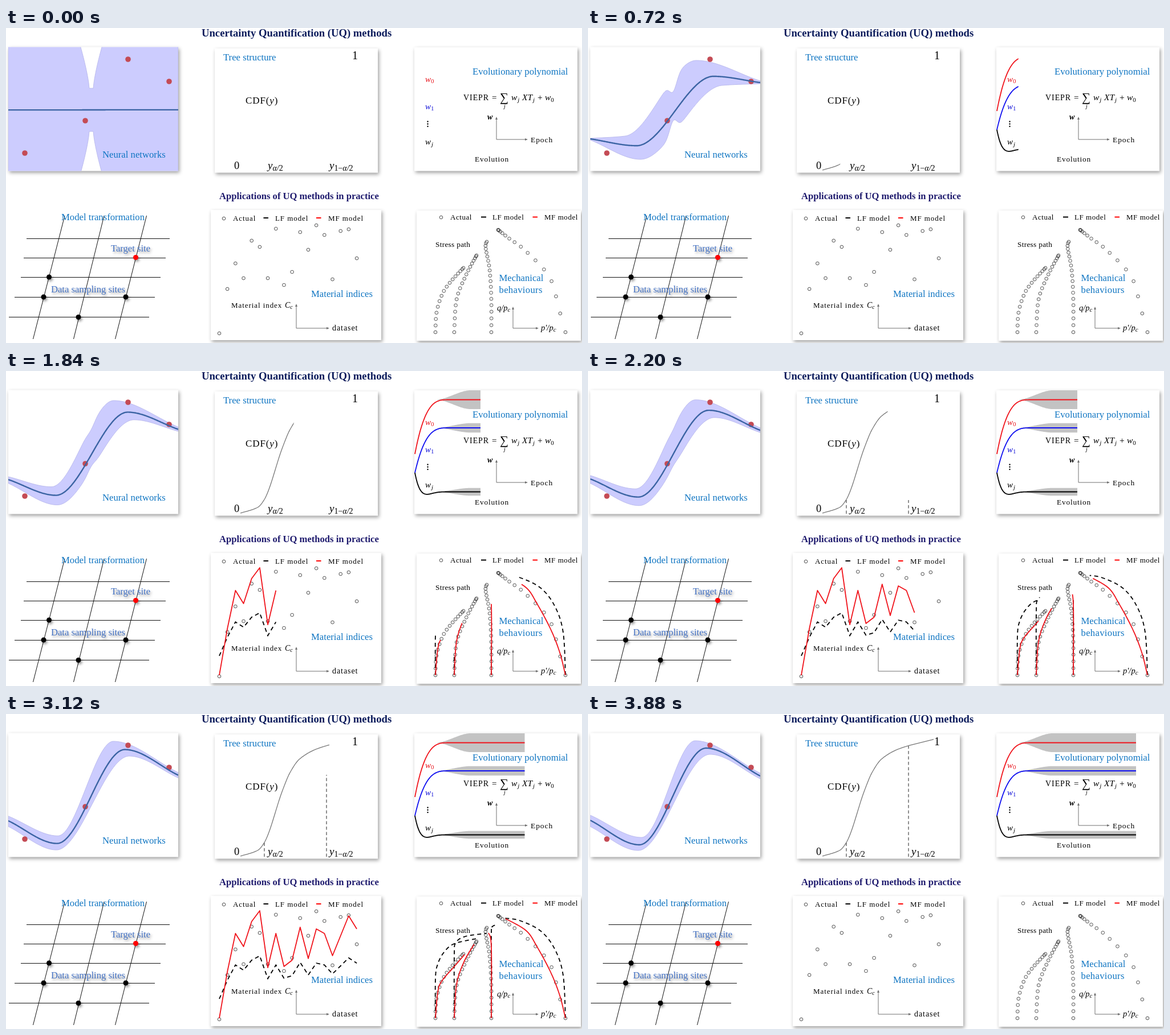
Animation of 1010x554 px, one loop 3920 ms. Source, as an HTML page:

```html
<!DOCTYPE html>
<html lang="en">
<head>
<meta charset="utf-8">
<title>Uncertainty Quantification (UQ) methods</title>
<style>
html, body { margin: 0; width: 100%; height: 100%; overflow: hidden; background: #fff; }
svg { display: block; width: 1010px; height: 554px; font-family: "Liberation Serif", "Times New Roman", serif; font-size: 13px; }
.card { fill: #fff; filter: drop-shadow(2px 3px 3px rgba(0,0,0,.38)); }
.head { font-weight: bold; fill: #0c1c5c; }
.name { font-size: 16.7px; fill: #0f75c2; }
.soft { font-size: 16.6px; fill: #4472c4; filter: drop-shadow(2px 3px 2px rgba(0,0,0,.4)); }
.wide { letter-spacing: .93px; }
.snug { letter-spacing: .55px; }
.it { font-style: italic; }
.line { fill: none; stroke-width: 1.8; }
.axis { fill: none; stroke: #707070; stroke-width: 1; }
.tip { fill: #707070; }
.grid { stroke: #111; stroke-width: 1; }
.node { filter: drop-shadow(2px 3px 2px rgba(0,0,0,.4)); }
.ring { fill: none; stroke: #333; stroke-width: .85; }
.dash { stroke: #555; stroke-width: 1.3; stroke-dasharray: 5.5 4; }
.lf { fill: none; stroke: #000; stroke-width: 1.8; stroke-dasharray: 7 5.5; }
.mf { fill: none; stroke: #f0141c; stroke-width: 1.8; stroke-linejoin: round; }
</style>
</head>
<body>
<svg viewBox="0 0 1010 554">
  <defs>
    <clipPath id="netBox"><rect x="4" y="33.5" width="298" height="218"/></clipPath>
    <clipPath id="cdfClip"><rect id="cdfWipe" x="410" y="36" width="0" height="218"/></clipPath>
    <clipPath id="evoClip"><rect id="evoWipe" x="716" y="30" width="0" height="222"/></clipPath>
  </defs>

  <text class="head" x="343" y="15" font-size="18.67">Uncertainty Quantification (UQ) methods</text>
  <text class="head" x="374" y="301" font-size="16.6" style="fill:#1f1b6e">Applications of UQ methods in practice</text>

  <rect class="card" x="4" y="33.5" width="298" height="218"/>
  <g clip-path="url(#netBox)">
    <path id="band" fill="#ccccfe" stroke="#b4b4ea" stroke-width=".8"/>
    <g fill="#c44b55">
      <circle cx="214" cy="55" r="4.8"/><circle cx="286" cy="94" r="4.8"/>
      <circle cx="139" cy="163" r="4.8"/><circle cx="33" cy="220" r="4.8"/>
    </g>
    <path id="mean" fill="none" stroke="#3b64a3" stroke-width="2.4"/>
  </g>
  <text class="name" x="169" y="228">Neural networks</text>

  <rect class="card" x="366" y="36" width="286" height="218.5"/>
  <polyline id="cdf" class="line" stroke="#777" style="stroke-width:1.3" clip-path="url(#cdfClip)"/>
  <line id="dashLow" class="dash" x1="453" x2="453" y1="251"/>
  <line id="dashHigh" class="dash" x1="562" x2="562" y1="251"/>
  <text class="name" x="381" y="57">Tree structure</text>
  <text x="420" y="133" font-size="17" letter-spacing=".9">CDF(<tspan class="it">y</tspan>)</text>
  <text x="607" y="55" font-size="20">1</text>
  <text x="400" y="248" font-size="18.5">0</text>
  <text class="it" x="459" y="248" font-size="19">y<tspan font-size="14" dy="3">α/</tspan><tspan font-size="14" font-style="normal">2</tspan></text>
  <text class="it" x="567" y="248" font-size="19">y<tspan font-size="14" dy="3" font-style="normal">1−</tspan><tspan font-size="14">α/</tspan><tspan font-size="14" font-style="normal">2</tspan></text>

  <rect class="card" x="716" y="34" width="286" height="217.5"/>
  <g id="evo" clip-path="url(#evoClip)"></g>
  <text class="name" x="818" y="82">Evolutionary polynomial</text>
  <g class="it" font-size="15">
    <text x="735" y="95" fill="#e8141c">w<tspan font-size="11" dy="2" font-style="normal">0</tspan></text>
    <text x="735" y="143" fill="#1414d8">w<tspan font-size="11" dy="2" font-style="normal">1</tspan></text>
    <text x="735" y="205">w<tspan font-size="11" dy="3" dx="1">j</tspan></text>
  </g>
  <circle cx="739.5" cy="164.5" r="1.2"/><circle cx="739.5" cy="168.7" r="1.2"/><circle cx="739.5" cy="173" r="1.2"/>
  <text x="802" y="127" font-size="14" class="wide">VIEPR</text>
  <text x="852" y="127" font-size="15">=</text>
  <text x="866" y="129" font-size="21">∑</text>
  <text class="it" x="873" y="141" font-size="10">j</text>
  <g class="it" font-size="15.5">
    <text x="886" y="127">w<tspan font-size="11" dy="3" dx="1">j</tspan></text>
    <text x="905" y="127">XT<tspan font-size="11" dy="3" dx="1">j</tspan></text>
    <text x="932" y="127" font-style="normal">+</text>
    <text x="945" y="127">w<tspan font-size="11" dy="3" font-style="normal">0</tspan></text>
  </g>
  <text class="it" x="844" y="161" font-size="14" font-weight="bold">w</text>
  <text class="wide" x="920" y="201" font-size="13.5">Epoch</text>
  <text x="822" y="235" font-size="13.3" letter-spacing=".85">Evolution</text>

  <path class="grid" d="M36 370.5H287M31 404.5H280M26 438.5H271M15 473.5H261M5 508.5H251M103 330L47.5 547M172 330L118.5 547M246.5 330L191.5 547"/>
  <g class="node">
    <circle cx="75.5" cy="438" r="4.5"/><circle cx="66" cy="473" r="4.5"/><circle cx="127" cy="508.5" r="4.5"/>
    <circle cx="210" cy="473" r="4.5"/><circle cx="227.5" cy="403.5" r="4.5" fill="#f00"/>
  </g>
  <text class="name" x="97" y="338">Model transformation</text>
  <text class="soft" x="184" y="393">Target site</text>
  <text class="soft" x="79" y="465">Data sampling sites</text>

  <rect class="card" x="359" y="320" width="299" height="229"/>
  <rect class="card" x="720" y="321" width="288" height="229"/>
  <g id="rings"></g>
  <g id="fits"></g>
  <g id="axes"></g>

  <g class="wide">
    <text x="398" y="339">Actual</text><text x="472" y="339">LF model</text><text x="565" y="339">MF model</text>
    <text x="395" y="492">Material index</text>
    <text x="572" y="532" font-size="14">dataset</text>
  </g>
  <g class="snug">
    <text x="779" y="337">Actual</text><text x="853" y="337">LF model</text><text x="944" y="337">MF model</text>
  </g>
  <path stroke="#000" stroke-width="2" d="M451.5 334H460M833 332.5H842"/>
  <path stroke="#f00" stroke-width="2" d="M544 334H552.5M923.5 332.5H932"/>
  <text class="it" x="489" y="492" font-size="14">C<tspan font-size="10" dy="2">c</tspan></text>
  <text class="name" x="535" y="473">Material indices</text>
  <text x="753" y="385" font-size="13.3" letter-spacing=".3">Stress path</text>
  <text class="name" x="864.5" y="445">Mechanical</text>
  <text class="name" x="864.5" y="466" letter-spacing=".3">behaviours</text>
  <text class="it" x="861" y="497" font-size="14.5">q/p<tspan font-size="11" dy="2">c</tspan></text>
  <text class="it" x="938" y="532" font-size="14.5">p'/p<tspan font-size="11" dy="2">c</tspan></text>
</svg>
<script>
const LOOP = 3920, TICK = 196;
const $ = id => document.getElementById(id);
const clamp = v => Math.min(1, Math.max(0, v));
const mix = (a, b, u) => a + (b - a) * u;
const ease = u => u * u * (3 - 2 * u);

function add(parent, tag, attrs) {
  const el = document.createElementNS("http://www.w3.org/2000/svg", tag);
  for (const k in attrs) el.setAttribute(k, attrs[k]);
  return parent.appendChild(el);
}
// "x,y x,y ..." to pairs, and back
const pairs = s => s.split(" ").map(p => p.split(",").map(Number));
const text = pts => pts.map(p => p[0].toFixed(2) + "," + p[1].toFixed(2)).join(" ");

// Samples y = f(x) at every pixel
function plot(f, from, to) {
  const out = [];
  for (let x = from; x <= to; x++) out.push([x, f(x)]);
  return out;
}

// Cubic function through points that never overshoots
function smooth(pts) {
  const slope = i => pts[i] && pts[i + 1] && (pts[i + 1][1] - pts[i][1]) / (pts[i + 1][0] - pts[i][0]);
  const m = pts.map((p, i) => {
    const a = slope(i - 1) ?? slope(i), b = slope(i) ?? a;
    return a * b <= 0 ? 0 : 2 * a * b / (a + b);
  });
  return x => {
    let i = 0;
    while (i < pts.length - 2 && x > pts[i + 1][0]) i++;
    const [[x0, y0], [x1, y1]] = [pts[i], pts[i + 1]];
    const h = x1 - x0, u = (x - x0) / h, v = 1 - u;
    return mix(y0, y1, ease(u)) + u * v * h * (v * m[i] - u * m[i + 1]);
  };
}

// Catmull-Rom through free points
function spline(pts) {
  const out = [pts[0]];
  for (let i = 0; i < pts.length - 1; i++) {
    const [a, b, c, d] = [pts[i - 1] || pts[i], pts[i], pts[i + 1], pts[i + 2] || pts[i + 1]];
    for (let s = 1; s <= 10; s++) {
      const u = s / 10;
      out.push([0, 1].map(k => b[k] + .5 * u * (c[k] - a[k]
        + u * (2 * a[k] - 5 * b[k] + 4 * c[k] - d[k] + u * (3 * (b[k] - c[k]) + d[k] - a[k])))));
    }
  }
  return out;
}

// First part of a polyline, by length
function trim(pts, part) {
  const len = pts.slice(1).map((p, i) => Math.hypot(p[0] - pts[i][0], p[1] - pts[i][1]));
  let left = part * len.reduce((a, b) => a + b, 0);
  const out = [pts[0]];
  for (let i = 0; i < len.length && left > 0; i++) {
    const u = Math.min(1, left / len[i]);
    out.push([0, 1].map(k => mix(pts[i][k], pts[i + 1][k], u)));
    left -= len[i];
  }
  return out;
}

// Network fit: start, trough, peak and end, before and after the slow settling
const net = {
  mean: ["4,195 85,207 220,85 302,96", "4,187 90,230 207,60 302,109"],
  up: ["4,194 65,190 190,57 302,93", "4,178 94,217 188,47 302,104"],
  lo: ["4,197 92,231 235,101 302,98", "4,198 88,240 214,71 302,114"]
};
const side = { mean: 0, up: -1, lo: 1 };
function drawNet(t) {
  const learn = 1 - (1 - clamp(t / 720)) ** 2;
  const settle = 1 - (1 - clamp((t - 720) / 3160)) ** 1.6;
  const curve = part => {
    const [from, to] = net[part].map(pairs);
    const fit = smooth(from.map((p, i) => p.map((v, k) => mix(v, to[i][k], settle))));
    const pinch = 23 * (1 - settle) ** 2;
    return plot(x => {
      const off = Math.abs(x - 149.5);
      const prior = 38 + Math.min(160, 9.5 * Math.max(0, off - 3.5) ** .75);
      const y = fit(x) - side[part] * pinch * Math.exp(-((off / 9) ** 2));
      return mix(144 + side[part] * prior, y, learn);
    }, 4, 302);
  };
  $("mean").setAttribute("d", "M" + text(curve("mean")));
  $("band").setAttribute("d", "M" + text([...curve("up"), ...curve("lo").reverse()]) + "Z");
}

const cdf = smooth(pairs("411,250 441,240 453,226 485,134 498,103 515,79 546,61 606,44.5"));
$("cdf").setAttribute("points", text(plot(cdf, 411, 606)));

// Weights settle on a level while their grey bands spread
function addWeight(color, start, end, half, power, bump) {
  const path = x => {
    const u = clamp((x - 717) / 60);
    return end + (start - end) * (1 - u) ** power + bump * u * (1 - u) ** 4;
  };
  const edge = sign => plot(x => end + sign * half * ease(clamp((x - 753) / 62)), 753, 963);
  add($("evo"), "polygon", { points: text([...edge(-1), ...edge(1).reverse()]), fill: "#c3c3c3" });
  add($("evo"), "polyline", { points: text(plot(path, 717, 963)), class: "line", stroke: color });
}
addWeight("#f0141c", 146, 50.5, 16.5, 3.3, 0);
addWeight("#1010f0", 179, 100, 8.3, 3.3, 0);
addWeight("#000", 179, 212.5, 6.8, 6, 110);

// Measured points: one series by site, four chains that thin out downwards
const ring = ([cx, cy]) => add($("rings"), "circle", { cx, cy, r: 2.8, class: "ring" });
const series = ys => ys.map((y, i) => [374 + 14.18 * i, y]);
function addChain(path, count, power) {
  const pts = spline(pairs(path));
  for (let i = 0; i < count; i++) ring(trim(pts, (i / (count - 1)) ** power).at(-1));
}
series([537, 459, 414, 440, 374, 385, 440, 353, 452, 429, 359, 390, 347, 364, 442, 357, 354, 405]).forEach(ring);
addChain("802,422 779,447 765,468 755,500 753,535", 16, 1.4);
addChain("825,400 806,436 790,478 786,535", 18, 1.5);
addChain("843,376 841,386 848,425 851,478 851,535", 19, 1.4);
addChain("863,355 882,370 910,391 953,438 969,492 981,535", 16, 2.4);
[[382, 335], [763, 333]].forEach(ring);

// Model curves: a quick first half, then a slower finish
const grow = (half, power, s) => s < 3 ? half * (s / 3) ** power : mix(half, 1, clamp((s - 3) / 3));
const fits = [];
function addFit(cls, pts, half, power) {
  const el = add($("fits"), "polyline", { class: cls });
  fits.push(s => el.setAttribute("points", text(
    power ? trim(pts, grow(half, power, s)) : pts.slice(0, 1 + Math.round(17 * grow(half, 1, s))))));
}
const addPath = (cls, half, path) => addFit(cls, spline(pairs(path)), half, 1.5);

const high = [535, 453, 386, 409, 365, 346, 446, 386, 444, 433, 375, 430, 378, 386, 425, 390, 355, 378];
addFit("lf", series(high.map(y => 287 + .4 * y)), 7 / 17);
addFit("mf", series(high), 7 / 17);
addPath("lf", .38, "753,535 753,465 757,440 768,419 786,404 825,395");
addPath("lf", .18, "786,535 786,425 789,402 806,391 842,386");
addPath("lf", .3, "851,535 851,390 853,374 862,371");
addPath("lf", .89, "981,535 977,460 963,415 938,382 900,363 871,359");
addPath("mf", .49, "753,535 757,490 764,470 787,443 804,423");
addPath("mf", .68, "786,535 790,476 803,436 821,405");
addPath("mf", .83, "851,535 851,410 846,385");
addPath("mf", .85, "981,535 971,495 955,454 931,409 912,381 876,360");

for (const [x, y, top, right] of [[860, 196, 156, 915], [509, 528, 485, 567], [889, 528, 490, 934]]) {
  add($("axes"), "path", { class: "axis", d: `M${x} ${top + 2}V${y}H${right - 2}` });
  add($("axes"), "path", { class: "tip", d: `M${x} ${top}l2 5h-4zM${right} ${y}l-5 -2v4z` });
}

function draw() {
  const t = performance.now() % LOOP, k = Math.floor(t / TICK);
  drawNet(t);
  $("cdfWipe").setAttribute("width", k ? 1 + 10.4 * k : 0);
  $("evoWipe").setAttribute("width", 12.9 * k);
  const rise = Math.max(0, 30 * (k - 10.2));
  $("dashLow").setAttribute("y2", 251 - Math.min(rise, 25));
  $("dashHigh").setAttribute("y2", 251 - Math.min(rise, 195));
  const shown = k > 6 && k < 17;
  $("fits").style.display = shown ? "" : "none";
  if (shown) fits.forEach(f => f(k - 6));
  requestAnimationFrame(draw);
}
draw();
</script>
</body>
</html>
```
